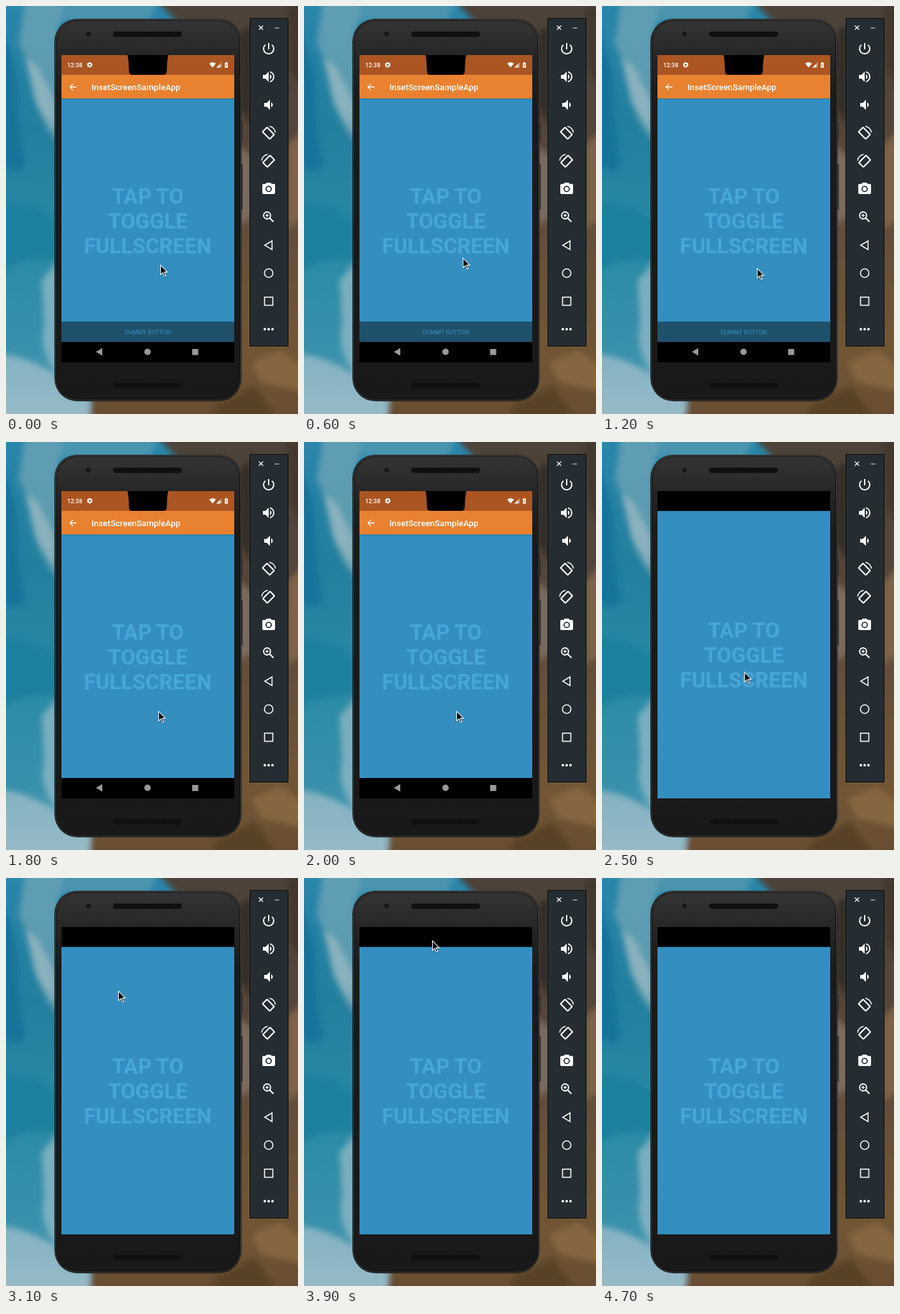
These frames come from a looping animation (458 by 640 pixels, 4800 ms). An HTML page:

```html
<!DOCTYPE html>
<html lang="en">
<head>
<meta charset="utf-8">
<title>Fullscreen toggle</title>
<style>
  html, body { margin: 0; width: 100%; height: 100%; overflow: hidden; background: #17191a; }
  svg { display: block; }
  text { font-family: Roboto, "Noto Sans", sans-serif; font-weight: 500; }

  .anim { animation: 4800ms steps(1) infinite; }
  #button { animation-name: button; }
  #appbar { animation-name: appbar; }
  #barFill { animation-name: barFill; }
  #statusFill { animation-name: statusFill; }
  #topCover { animation-name: topCover; }
  #navCover { animation-name: navCover; }
  #heading { animation-name: heading; }
  #cursor { animation-name: cursor; }

  @keyframes button { 0% { opacity: 1 } 37.5%, 100% { opacity: 0 } }
  @keyframes appbar {
    0% { transform: translateY(0) }
    45.833% { transform: translateY(-25px) }
    47.916%, 100% { transform: translateY(-37px) }
  }
  @keyframes barFill { 0% { fill: #e98230 } 45.833%, 100% { fill: #b25522 } }
  @keyframes statusFill { 0% { fill: #ab5522 } 45.833%, 100% { fill: #994b21 } }
  @keyframes topCover {
    0% { transform: translateY(0) }
    45.833% { transform: translateY(11px) }
    47.916% { transform: translateY(23px) }
    50%, 100% { transform: translateY(31px) }
  }
  @keyframes navCover {
    0% { transform: translateY(0) }
    45.833% { transform: translateY(12px) }
    47.916% { transform: translateY(24px) }
    50%, 100% { transform: translateY(32px) }
  }
  @keyframes heading {
    0% { transform: translateY(0) }
    45.833% { transform: translateY(-7px) }
    47.916%, 100% { transform: translateY(-3px) }
  }
  @keyframes cursor {
    0% { transform: translate(242px, 406px); animation-timing-function: steps(6) }
    12.5% { transform: translate(249px, 395px); animation-timing-function: steps(10) }
    33.333%, 47.916% { transform: translate(239px, 422px); animation-timing-function: steps(8) }
    64.583% { transform: translate(176px, 177px); animation-timing-function: steps(8) }
    81.25% { transform: translate(201px, 98px); animation-timing-function: steps(7) }
    95.833%, 100% { transform: translate(225px, -25px) }
  }
</style>
</head>
<body>
<svg width="458" height="640" viewBox="0 0 458 640">
  <defs>
    <linearGradient id="sea" x1="0" y1="0" x2="0" y2="1">
      <stop offset="0" stop-color="#2a86aa"/>
      <stop offset=".3" stop-color="#237f9e"/>
      <stop offset=".6" stop-color="#2b8ba5"/>
      <stop offset=".85" stop-color="#3a91ac"/>
      <stop offset="1" stop-color="#6aa6b8"/>
    </linearGradient>
    <linearGradient id="rock" x1="0" y1="0" x2="0" y2="1">
      <stop offset="0" stop-color="#4d4239"/>
      <stop offset=".35" stop-color="#54453a"/>
      <stop offset=".6" stop-color="#66503a"/>
      <stop offset=".85" stop-color="#715535"/>
      <stop offset="1" stop-color="#674d31"/>
    </linearGradient>
    <linearGradient id="body" x1="0" y1="0" x2="0" y2="1">
      <stop offset="0" stop-color="#353535"/>
      <stop offset=".1" stop-color="#252525"/>
      <stop offset=".2" stop-color="#1b1b1b"/>
      <stop offset="1" stop-color="#191919"/>
    </linearGradient>
    <pattern id="mesh" width="3" height="3" patternUnits="userSpaceOnUse">
      <rect width="3" height="3" fill="#0c0c0c"/>
      <circle cx="1.5" cy="1.5" r=".7" fill="#242424"/>
    </pattern>
    <filter id="soft" x="-20%" y="-20%" width="140%" height="140%"><feGaussianBlur stdDeviation="5"/></filter>
    <filter id="shadow" x="-20%" y="-20%" width="140%" height="140%"><feGaussianBlur stdDeviation="1.2"/></filter>
  </defs>

  <!-- coast -->
  <rect width="458" height="640" fill="url(#sea)"/>
  <g filter="url(#soft)">
    <path d="M-10 40Q18 80 18 140T30 250Q10 270 -10 240Z" fill="#17739a"/>
    <path d="M30 -10H90L80 60 82 215Q50 180 42 130T20 60Z" fill="#83adba" opacity=".6"/>
    <path d="M30 80L50 96 78 150V200L46 150Z" fill="#a9c2c9" opacity=".6"/>
    <path d="M-10 310Q40 300 82 340V400Q30 390 -10 420Z" fill="#1f819e"/>
    <path d="M56 430L82 400V580Q50 540 60 500Z" fill="#a2c0cb" opacity=".65"/>
    <path d="M-10 545Q36 550 80 580L132 620V650H-10Z" fill="#b4c9d1" opacity=".6"/>
    <path d="M90 -10H240L225 24H80Z" fill="#5f9fb4" opacity=".6"/>
    <path d="M235 -10H470V650H130L135 610 260 560 300 60Z" fill="url(#rock)"/>
    <path d="M368 40L384 30V190L368 160Z" fill="#2f2a26"/>
    <path d="M440 0H470V140L446 100Z" fill="#42382f"/>
    <path d="M366 220L384 235V330L366 345Z" fill="#7a6d60"/>
    <path d="M441 220L470 190V330L441 350Z" fill="#7d634a"/>
    <path d="M330 625L390 595 425 645H320Z" fill="#594228"/>
    <path d="M385 560L430 540 470 570V605L400 590Z" fill="#866640"/>
  </g>

  <!-- phone -->
  <path d="M368 183h3.500v27H368zM368 248h3.500v71H368z" fill="#393735"/>
  <rect x="76" y="20" width="293.500" height="600" rx="36" fill="#0b0b0b"/>
  <rect x="77.500" y="21" width="291" height="597.500" rx="35" fill="url(#body)" stroke="#454545"/>
  <rect x="79.500" y="23" width="287" height="593" rx="33" fill="none" stroke="#151515"/>
  <circle cx="129.500" cy="44" r="3.500" fill="#111"/>
  <circle cx="129.500" cy="44" r="1.500" fill="#222"/>
  <rect x="168" y="40" width="108" height="8.500" rx="4" fill="url(#mesh)"/>
  <rect x="168" y="591" width="108" height="9" rx="4" fill="url(#mesh)"/>

  <!-- screen -->
  <svg x="87" y="77" width="271" height="482" viewBox="87 77 271 482">
    <rect x="87" y="77" width="271" height="482" fill="#000"/>
    <rect x="87" y="108" width="271" height="419" fill="#348fc0"/>
    <g fill="#999">
      <path d="M141 542.500l10-6v12z"/>
      <circle cx="222" cy="542.500" r="5"/>
      <rect x="292" y="538" width="9.500" height="9.500"/>
    </g>
    <rect id="navCover" class="anim" x="87" y="494" width="271" height="33" fill="#348fc0"/>

    <g id="heading" class="anim" fill="#48a5d7" text-anchor="middle" font-size="33.200">
      <text x="222.300" y="310" style="font-weight:700">TAP TO</text>
      <text x="222.300" y="349" style="font-weight:700">TOGGLE</text>
      <text x="222.300" y="388" style="font-weight:700">FULLSCREEN</text>
    </g>

    <g id="button" class="anim">
      <rect x="87" y="495" width="271" height="32" fill="#20516a"/>
      <text x="222.500" y="514.700" font-size="9.330" text-anchor="middle" fill="#2f82b0">DUMMY BUTTON</text>
    </g>

    <g id="appbar" class="anim">
      <rect x="87" y="145" width="271" height="1.500" fill="#000" opacity=".12"/>
      <rect id="barFill" class="anim" x="87" y="108" width="271" height="37" fill="#e98230"/>
      <path d="M110.500 127H100.500M105 122.200L100.300 127l4.700 4.800" fill="none" stroke="#fff" stroke-width="1.300"/>
      <text x="134" y="131.800" font-size="13.330" fill="#fff">InsetScreenSampleApp</text>
    </g>

    <g>
      <rect id="statusFill" class="anim" x="87" y="77" width="271" height="31" fill="#ab5522"/>
      <text x="96" y="96" font-size="9.330" fill="#fff">12:38</text>
      <circle cx="131.300" cy="92.300" r="2.600" fill="none" stroke="#fff" stroke-width="1.900"/>
      <circle cx="131.300" cy="92.300" r="3.800" fill="none" stroke="#fff" stroke-width="1.200" stroke-dasharray="1.990"/>
      <g fill="#fff">
        <path d="M318.800 90.200Q324 86.500 329.200 90.200L324 96.500Z"/>
        <path d="M338.500 88v8.500H330Z" opacity=".4"/>
        <path d="M335.500 91v5.500H330Z"/>
        <path d="M344.600 88h2v1h1.400v7.800h-4.800V89h1.400z"/>
      </g>
      <path d="M346 90.500l-1.500 2.800h1v2l1.500-2.800h-1z" fill="#ab5522"/>
      <path d="M190.500 77H254.500Q252.500 84 252.200 102 252 108 247 108H198Q193 108 192.800 102 192.500 84 190.500 77Z" fill="#000"/>
    </g>
    <rect id="topCover" class="anim" x="87" y="46" width="271" height="31" fill="#000"/>
  </svg>

  <!-- emulator controls -->
  <rect x="382.500" y="19.500" width="60" height="514" fill="#252d32" stroke="#07090a"/>
  <g fill="none" stroke="#fff" stroke-width="1.300">
    <path d="M396.700 30.700l6.600 6.600M403.300 30.700l-6.600 6.600"/>
    <path d="M421.500 34.500h7" stroke="#bbc0c2"/>
  </g>
  <g fill="#fff">
    <path transform="translate(400 55)" d="M13 3h-2v10h2zM17.830 5.170l-1.420 1.420A7 7 0 1 1 7.580 6.580L6.170 5.170A9 9 0 1 0 17.830 5.170z"/>
    <path transform="translate(400 99)" d="M3 9v6h4l5 5V4L7 9zM16.500 12A4.500 4.500 0 0 0 14 7.970v8.050A4.500 4.500 0 0 0 16.500 12zM14 3.230v2.060a7 7 0 0 1 0 13.420v2.060a9 9 0 0 0 0-17.540z"/>
    <path transform="translate(400 143)" d="M5 9v6h4l5 5V4L9 9zM18.500 12A4.500 4.500 0 0 0 16 7.970v8.050A4.500 4.500 0 0 0 18.500 12z"/>
    <path transform="translate(400 275)" fill-rule="evenodd" d="M9 2L7.170 4H4a2 2 0 0 0-2 2v12a2 2 0 0 0 2 2h16a2 2 0 0 0 2-2V6a2 2 0 0 0-2-2h-3.170L15 2zM12 7a5 5 0 1 1 0 10 5 5 0 0 1 0-10z"/>
    <circle cx="412" cy="287" r="3.200"/>
    <circle cx="406" cy="507" r="2"/>
    <circle cx="412" cy="507" r="2"/>
    <circle cx="418" cy="507" r="2"/>
  </g>
  <g fill="none" stroke="#fff" stroke-width="1.800">
    <g id="rotate" transform="translate(412 199)">
      <rect x="-8" y="-5" width="16" height="10" rx="1" transform="translate(-.5 .5) rotate(45)" stroke-width="2.200"/>
      <path d="M1-10.200A10.500 10.500 0 0 1 10.500-.5" stroke-width="1.500"/>
    </g>
    <use href="#rotate" transform="matrix(-1 0 0 1 823.500 44)"/>
    <circle cx="409.500" cy="328.500" r="5.500"/>
    <path d="M413.500 332.500l6 6" stroke-width="2.200"/>
    <path d="M406.700 328.500h5.600M409.500 325.700v5.600" stroke-width="1.300"/>
    <path d="M405.800 375.300l11.500-6.800v13.600z" stroke-width="1.600"/>
    <circle cx="412" cy="419" r="6.700" stroke-width="1.600"/>
    <rect x="405.500" y="456.700" width="13" height="12.800" stroke-width="1.600"/>
  </g>

  <g id="cursor" class="anim">
    <path d="M0 0V16.200l3.700-3.500 2.600 5.800 2.900-1.200-2.600-5.700H11.700Z" fill="#000" opacity=".3" transform="translate(.5 1.200)" filter="url(#shadow)"/>
    <path d="M.5.500V15.500l3.500-3.300 2.600 5.700 2.200-.9-2.600-5.600h4.900Z" fill="#000" stroke="#fff" stroke-width="1.100"/>
  </g>
</svg>
</body>
</html>
```
